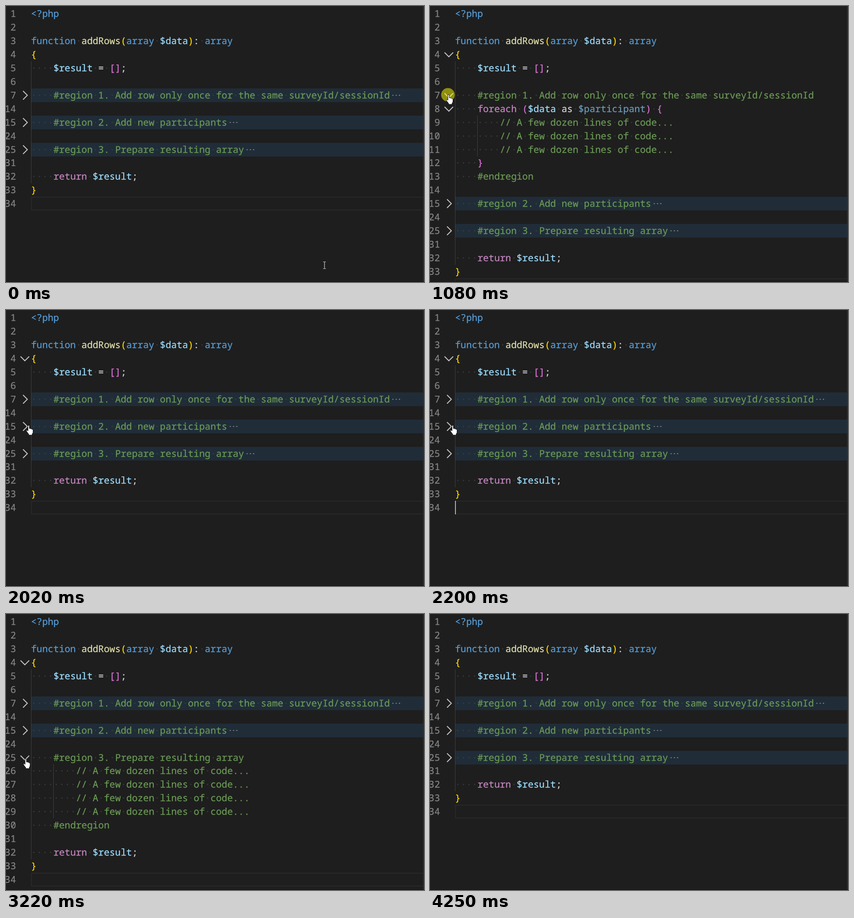
Animation, 920 px wide and 609 px high, one loop 8000 ms. Source, as an HTML page:

```html
<!DOCTYPE html>
<html lang="en">
<head>
<meta charset="utf-8">
<title>Folding code regions</title>
<style>
html, body { margin: 0; width: 100%; height: 100%; overflow: hidden; background: #1e1e1e; }
#stage {
  position: relative; width: 920px; height: 609px; overflow: hidden; background: #1e1e1e;
  font: 20.57px/30px "Noto Sans Mono", "DejaVu Sans Mono", monospace;
  color: #d4d4d4; white-space: pre; text-rendering: geometricPrecision;
  -webkit-text-stroke: .3px;
}
#stage > *, .row > * { position: absolute; }
.row { left: 0; width: 918px; height: 30px; }
.num { right: 896px; top: 0; color: #858585; }
.code { left: 55px; top: 0; }
.bar { left: 55px; right: 0; top: 0; height: 30px; background: #202d39; }
.guide { width: 1px; height: 30px; background: #404040; }
.current { left: 55px; right: 0; top: 0; height: 30px; box-sizing: border-box; border: 2px solid #282828; border-right: 0; }
.more {
  display: inline-block; width: 22px; height: 4px; margin-left: 3px; vertical-align: 5px;
  background: radial-gradient(circle, #8a8a8a 1px, transparent 1.6px) 0 0 / 7.2px 4px repeat-x;
}
.row .bar, .row .more, .row .right { visibility: hidden; }
.folded .bar, .folded .more, .folded .right { visibility: visible; }
.folded .down { visibility: hidden; }
.chevron { left: 30px; top: 3px; width: 24px; height: 24px; fill: none; stroke: #c5c5c5; stroke-width: 2; }
.ws { color: #3e3e3d; -webkit-text-stroke: 0; }
.comment { color: #6a9955; }
.var { color: #9cdcfe; }
.dim { color: #6a9ab5; }
.key { color: #569cd6; }
.flow { color: #c586c0; }
.name { color: #dcdcaa; }
.outer { color: #ffd700; }
.inner { color: #da70d6; }
#caret { left: 55px; width: 2px; height: 30px; background: #aeafad; }
#click { left: 0; top: 0; width: 30px; height: 30px; border-radius: 50%; background: rgba(255, 255, 0, .5); }
#cursor { left: 0; top: 0; width: 1px; height: 1px; overflow: visible; }
#ruler { left: 918px; top: 0; width: 1px; height: 609px; background: #383838; }
#edge { left: 0; top: 608px; width: 920px; height: 1px; background: #111; }
</style>
</head>
<body>
<div id="stage">
  <div id="caret"></div>
  <div id="ruler"></div>
  <div id="edge"></div>
  <div id="click"></div>
  <svg id="cursor">
    <path id="hand" fill="#fff" stroke="#111" stroke-width="1" transform="translate(-5.5 0)"
      d="M4 1.8Q4 .5 5.5 .5Q7 .5 7 1.8V7.5Q9.5 6.6 10 8.3Q12.4 7.6 12.8 9.3Q15 9 15 11V15Q15 18 13.2 19V22H5.5V20Q3 17 .8 13.5Q-.2 11.5 1.2 11Q2.5 10.6 4 13Z"/>
    <path id="beam" fill="none" stroke="#d0d0d0" stroke-width="1.2" d="M-3-7.5H-1L0-7L1-7.5H3M0-7V7M-3 7.5H-1L0 7L1 7.5H3"/>
  </svg>
</div>
<script>
const LOOP = 8000, PITCH = 29.95, TOP = 2;
const $ = id => document.getElementById(id);
const stage = $('stage');

const filler = n => Array(n).fill('        // A few dozen lines of code...');
const loop = n => ['    foreach ($data as $participant) {', ...filler(n), '    }'];
const region = (title, body) => ['    #region ' + title, ...body, '    #endregion'];
const source = [
  '<?php', '', 'function addRows(array $data): array', '{', '    $result = [];', '',
  ...region('1. Add row only once for the same surveyId/sessionId', loop(3)), '',
  ...region('2. Add new participants', loop(5)), '',
  ...region('3. Prepare resulting array', filler(4)), '',
  '    return $result;', '}', ''
];

// First and last line of each region, and when it is open
const regions = [
  { first: 7, last: 13, open: [1020, 1500] },
  { first: 15, last: 23, open: [2080, 2200] },
  { first: 25, last: 30, open: [2740, 3280] }
];

const rules = [
  ['comment', /^(#|\/\/).*/], ['dim', /^\$participant/], ['var', /^\$\w+/],
  ['key', /^(<\?php|function|array)/], ['flow', /^(return|foreach)/],
  ['name', /^\w+(?=\()/], ['bracket', /^[()[\]{}]/], ['', /^(\w+|.)/]
];
const escape = s => s.replace(/</g, '&lt;').replace(/ /g, '<span class="ws">·</span>');

function paint(line) {
  const depth = line.startsWith(' ') ? 'inner' : 'outer';
  let html = '';
  while (line) {
    const [kind, re] = rules.find(r => r[1].test(line));
    const text = line.match(re)[0];
    html += `<span class="${kind === 'bracket' ? depth : kind}">${escape(text)}</span>`;
    line = line.slice(text.length);
  }
  return html;
}

const chevron = (cls, d) => `<svg class="chevron ${cls}"><path d="${d}"/></svg>`;
const down = cls => chevron('down ' + cls, 'M2 7.5L11.5 17L21 7.5');
const right = chevron('right', 'M7.5 2.5L17 12L7.5 21.5');
const guide = x => `<i class="guide" style="left:${x}px"></i>`;

const rows = source.map((line, i) => {
  const n = i + 1, head = regions.find(r => r.first === n);
  const row = document.createElement('div');
  row.className = 'row';
  row.innerHTML =
    (head ? '<i class="bar"></i>' : '') +
    (n === source.length ? '<i class="current"></i>' : '') +
    (n > 4 && n < 33 ? guide(55) : '') +
    (line.startsWith('        ') ? guide(104) : '') +
    `<span class="num">${n}</span>` +
    `<span class="code">${paint(line)}${head ? '<i class="more"></i>' : ''}</span>` +
    (head ? down('') + right : line.endsWith('{') ? down('hover') : '');
  stage.insertBefore(row, $('caret'));
  return row;
});
const hovers = stage.querySelectorAll('.hover');

let shown = '';
function layout(t) {
  const open = regions.map(r => t >= r.open[0] && t < r.open[1]);
  if (shown === String(open)) return;
  shown = String(open);
  let k = 0, y = 0;
  rows.forEach((row, i) => {
    const n = i + 1;
    const hidden = regions.some((r, j) => !open[j] && n > r.first && n <= r.last);
    row.style.display = hidden ? 'none' : '';
    if (!hidden) row.style.top = (y = Math.round(TOP + PITCH * k++)) + 'px';
  });
  regions.forEach((r, j) => rows[r.first - 1].classList.toggle('folded', !open[j]));
  $('caret').style.top = y + 'px';
}

const ramp = (t, a, b) => Math.min(1, Math.max(0, (t - a) / (b - a)));
const ease = u => u * u * (3 - 2 * u);
const pulse = (t, a, b) => Math.min(ramp(t, a, a + 180), 1 - ramp(t, b - 180, b));

// time, x, y
const route = [
  [20, 701, 572], [540, 41, 195], [1640, 41, 195], [1960, 50, 254],
  [2260, 50, 254], [2470, 43.5, 319], [3300, 43.5, 319], [3930, 390, 469]
];
function place(t) {
  const i = route.findIndex(p => p[0] > t);
  if (i < 0) return route[route.length - 1].slice(1);
  if (i === 0) return route[0].slice(1);
  const a = route[i - 1], b = route[i], u = ease(ramp(t, a[0], b[0]));
  return [a[1] + (b[1] - a[1]) * u, a[2] + (b[2] - a[2]) * u];
}

const blinks = [[720, 1080], [2020, 2800], [3400, 4250]];
const clicks = [[970, 1150], [1440, 1520], [2040, 2150], [2690, 2810], [3280, 3345]];
const show = (el, on) => el.style.visibility = on ? 'visible' : 'hidden';

function draw(t) {
  layout(t);
  $('caret').style.opacity = Math.max(...blinks.map(b => pulse(t, ...b)));
  const hover = ramp(t, 420, 540) - ramp(t, 3500, 3900);
  hovers.forEach(el => el.style.opacity = hover);

  const [x, y] = place(t), onGutter = x < 56, visible = t < 3980;
  $('cursor').style.transform = `translate(${x}px, ${y}px)`;
  show($('hand'), visible && onGutter);
  show($('beam'), visible && !onGutter);
  $('click').style.transform = `translate(${x - 16.5}px, ${y - 14}px)`;
  show($('click'), clicks.some(c => t >= c[0] && t < c[1]));
}

let start;
function tick(now) {
  start ??= now;
  draw((now - start) % LOOP);
  requestAnimationFrame(tick);
}
draw(0);
requestAnimationFrame(tick);
</script>
</body>
</html>
```
